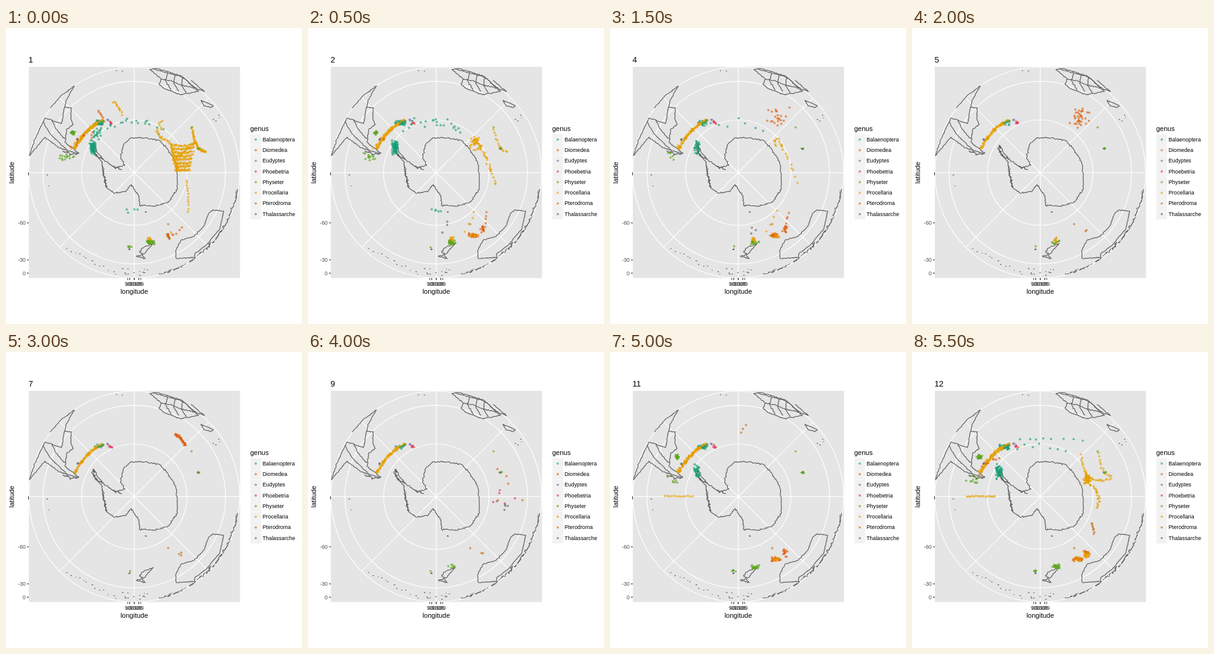
Animation of 480 by 480 pixels, one loop 6 s. Source, as an HTML page with a canvas:

```html
<!DOCTYPE html>
<html lang="en">
<head>
<meta charset="utf-8">
<title>Sightings by month</title>
<style>
html, body { margin: 0; width: 100%; height: 100%; overflow: hidden; background: #fff; }
canvas { display: block; width: 480px; height: 480px; }
</style>
</head>
<body>
<canvas id="map" width="480" height="480"></canvas>
<script>
const ctx = document.getElementById('map').getContext('2d');
const CX = 208, CY = 234.5, R = 171, STEP = 500, MONTHS = 12;
const INK = '#595959', RAD = Math.PI / 180;
const [BAL, DIO, EUD, PHO, PHY, PRO, PTE, THA] = [0, 1, 2, 3, 4, 5, 6, 7];
const genera = [
  ['Balaenoptera', '#1b9e77'], ['Diomedea', '#e0600f'], ['Eudyptes', '#7570b3'], ['Phoebetria', '#e7298a'],
  ['Physeter', '#5ca61e'], ['Procellaria', '#e69f00'], ['Pterodroma', '#c56a15'], ['Thalassarche', '#666666']
];

let seed = 1;
function rnd() {
  seed = (seed * 16807) % 2147483647;
  return seed / 2147483647;
}
const spread = s => (rnd() + rnd() - 1) * s;

function label(str, x, y, size, color = '#000', align = 'left') {
  ctx.font = size + 'px "Liberation Sans", Arial, sans-serif';
  ctx.fillStyle = color;
  ctx.textAlign = align;
  ctx.fillText(str, x, y);
}

function segment(x1, y1, x2, y2) {
  ctx.beginPath();
  ctx.moveTo(x1, y1);
  ctx.lineTo(x2, y2);
  ctx.stroke();
}

// Line through a few corners, roughened by seeded noise
function coast(rough, ...p) {
  ctx.lineWidth = 1.15;
  ctx.beginPath();
  ctx.moveTo(p[0], p[1]);
  for (let i = 2; i < p.length; i += 2) {
    const dx = p[i] - p[i - 2], dy = p[i + 1] - p[i - 1];
    const n = Math.ceil(Math.hypot(dx, dy) / 1.8);
    for (let k = 1; k <= n; k++) {
      const w = k < n ? rough : 0;
      ctx.lineTo(p[i - 2] + dx * k / n + spread(w), p[i - 1] + dy * k / n + spread(w));
    }
  }
  ctx.stroke();
}

function islets(n, x, y, sx, sy) {
  ctx.fillStyle = INK;
  while (n--) ctx.fillRect(x + spread(sx), y + spread(sy), 1 + rnd() * 1.6, 1.2);
}

function dot(g, x, y) {
  ctx.globalAlpha = 0.64;
  ctx.fillStyle = genera[g][1];
  ctx.beginPath();
  ctx.arc(x, y, 1.85, 0, 7);
  ctx.fill();
  ctx.globalAlpha = 1;
}

function blob(g, n, x, y, sx = 0, sy = sx) {
  for (let i = 0; i < Math.round(n); i++) dot(g, x + spread(sx), y + spread(sy));
}

// Points along a quadratic curve; clumps > 0 gathers them into groups
function trail(g, n, wobble, x0, y0, cx, cy, x1, y1, clumps = 0) {
  n = Math.round(n);
  for (let i = 0; i < n; i++) {
    let t = (i + 0.5) / n;
    if (clumps) t -= Math.sin(t * clumps * 2 * Math.PI) / (clumps * 2 * Math.PI) * 0.9;
    const a = (1 - t) * (1 - t), b = 2 * t * (1 - t), c = t * t;
    dot(g, a * x0 + b * cx + c * x1 + spread(wobble), a * y0 + b * cy + c * y1 + spread(wobble));
  }
}

function drawGrid() {
  ctx.fillStyle = '#e5e5e5';
  ctx.fillRect(37, 63, 342.5, 342.5);
  ctx.strokeStyle = '#fff';
  ctx.lineWidth = 1.2;
  for (const lat of [60, 30, 0]) {
    ctx.beginPath();
    ctx.arc(CX, CY, R * Math.cos(lat * RAD), 0, 7);
    ctx.stroke();
  }
  for (let a = 0; a < 360; a += 45) segment(CX, CY, CX + R * Math.cos(a * RAD), CY + R * Math.sin(a * RAD));
}

function drawLimb() {
  for (let a = 9; a < 76; a += 0.9) {
    if (a > 50 && rnd() < 0.3) continue;
    ctx.lineWidth = 0.7 + rnd();
    ctx.beginPath();
    ctx.arc(CX, CY, R - rnd() * rnd() * 5, a * RAD, (a + 0.6 + rnd() * 1.8) * RAD);
    ctx.stroke();
  }
}

function drawLand() {
  seed = 77;
  ctx.strokeStyle = INK;
  ctx.lineJoin = 'round';
  // Antarctica, with a ragged peninsula
  coast(1.5, 143, 190, 148, 202, 160, 215, 178, 227, 193, 222, 186, 212, 188, 199, 190, 190, 202, 178, 226, 178, 250, 183,
    263, 198, 275, 217, 278, 240, 278, 260, 265, 281, 243, 289, 217, 288, 216, 273, 203, 254, 195, 265, 176, 268,
    163, 259, 159, 240, 155, 217, 139, 196, 143, 190);
  coast(4, 141, 190, 144, 205, 156, 213);
  coast(3.5, 157, 223, 159, 240, 163, 258);
  coast(3, 174, 223, 188, 230);
  // South America
  coast(1, 72, 130, 90, 109, 111, 94, 97, 118, 95, 129, 106, 129, 105, 146, 109, 156, 98, 165, 96, 186, 118, 203);
  coast(1, 95, 129, 90, 155, 63, 146, 47, 180, 38, 207, 63, 177, 85, 194, 118, 204);
  coast(1, 60, 152, 72, 172, 100, 199);
  coast(1, 74, 149, 80, 162, 95, 180);
  coast(4, 92, 199, 104, 204, 118, 203);
  // Southern Africa and Madagascar
  coast(1, 233, 67, 252, 83, 248, 91, 256, 98, 282, 108, 312, 103, 285, 78, 246, 66, 233, 67);
  coast(1, 239, 66, 286, 80, 310, 99, 322, 103, 300, 85);
  coast(1, 252, 83, 266, 85, 280, 91, 306, 98);
  for (let i = 0; i < 3; i++) coast(1, 262 + 12 * i, 73 + 4 * i, 259 + 13 * i, 86 + 4 * i, 268 + 12 * i, 101 + 2 * i);
  coast(0.8, 316, 117, 336, 126, 333, 129, 321, 126, 316, 117);
  // Australia
  coast(0.9, 276, 374, 275, 361, 284, 344, 305, 338, 320, 322, 329, 300, 335, 295, 353, 297, 347, 325, 325, 352,
    306, 366, 305, 372, 276, 374);
  // New Zealand
  coast(1.4, 239, 349, 220, 357, 217, 364, 224, 366, 239, 349);
  coast(1.4, 211, 370, 220, 367, 226, 374, 211, 370);
  drawLimb();
  islets(14, 205, 396, 32, 8);
  for (let i = 0; i < 12; i++) islets(1, 96 + i * 7, 357 + i * 3.4, 4, 3);
  islets(8, 311, 195, 2, 1.5);
  islets(3, 226, 298, 2, 1);
  islets(3, 200, 358, 1.5, 2);
  islets(4, 343, 143, 9, 9);
  islets(2, 180, 69, 25, 1);
  islets(2, 75, 266, 20, 38);
}

function drawFrame(month) {
  ctx.fillStyle = '#fff';
  ctx.fillRect(0, 0, 480, 480);
  drawGrid();
  drawLand();
  label(month, 36.5, 56, 13.2);

  ctx.strokeStyle = '#333';
  ctx.lineWidth = 1.1;
  [['-60', 316], ['-30', 376], ['0', 397.5]].forEach(([s, y]) => {
    segment(34, y, 37, y);
    label(s, 32, y + 3.2, 8.8, '#4d4d4d', 'right');
  });
  segment(36.5, 234, 36.5, 239);
  for (let lon = -135; lon <= 180; lon += 45) {
    const x = CX + 10.5 * Math.sin(lon * RAD);
    segment(x, 405.5, x, 408.5);
    label(Math.abs(lon), x, 417.5, 8.8, '#4d4d4d', 'center');
  }
  label('longitude', CX, 431, 11, '#000', 'center');
  ctx.save();
  ctx.translate(13, CY);
  ctx.rotate(-Math.PI / 2);
  label('latitude', 0, 0, 11, '#000', 'center');
  ctx.restore();

  label('genus', 396, 167, 11);
  genera.forEach(([name], i) => {
    const y = 180.8 + i * 17.28;
    ctx.fillStyle = '#f2f2f2';
    ctx.fillRect(396.4, y - 8.64, 17.28, 17.28);
    dot(i, 405, y);
    label(name, 416, y + 2.95, 8.8);
  });
}

function drawSightings(month) {
  seed = 4100 + month * 37;
  // 1 at the peak month, falling to 0 after the given number of months
  const near = (peak, width) => {
    const d = Math.abs(month - peak), gap = Math.min(d, MONTHS - d);
    return gap < width ? Math.cos(gap / width * Math.PI / 2) : 0;
  };
  const summer = near(1, 4);

  // Scotia arc, present all year
  trail(PRO, 45 * summer, 3, 108, 195, 133, 158, 158, 150);
  blob(BAL, 6 + 42 * summer, 150, 154, 9, 5);
  trail(PRO, 100, 2, 112, 195, 133, 158, 157, 150, 4);
  trail(BAL, 5, 1, 149, 155, 154, 153, 159, 150);
  trail(DIO, 3, 1, 168, 150, 169, 153, 173, 156);
  blob(PHO, 3, 170, 154, 3, 2);
  blob(EUD, 2, 165, 149, 1);
  blob(THA, 2, 116, 181, 1);

  // Peninsula and southern feeding grounds
  blob(BAL, 80 * near(1.5, 3.4), 141, 194, 6, 13);
  trail(BAL, 22 * near(2, 2.5), 9, 160, 161, 205, 140, 255, 170);
  blob(BAL, 20 * near(1, 1), 148, 172, 8, 14);
  trail(DIO, 12 * near(12.7, 1.4), 7, 108, 195, 125, 175, 143, 170);

  // South American shelf
  blob(PHY, 28 * near(12.4, 2.7), 109, 170, 5, 4);
  blob(PHY, 14 * near(1.5, 3.4), 99, 208, 13, 8);
  trail(PRO, 18 * near(11.6, 1.2), 1, 87, 234, 112, 234, 136, 234);

  // South Atlantic
  trail(PRO, 12 * near(1, 1), 2, 172, 119, 184, 124, 188, 141);
  trail(DIO, 6 * near(1, 1), 1, 149, 134, 153, 139, 158, 146);
  trail(PTE, 3 * near(11, 1), 1, 222, 116, 216, 124, 211, 133);
  trail(BAL, 8 * near(12, 1), 4, 172, 146, 215, 133, 284, 146);

  // Southern Indian Ocean survey lines
  if (month === 1) {
    for (let i = 0; i < 8; i++) trail(PRO, 22, 2, 268 + i, 189 + i * 6, 285, 189 + i * 6 + spread(8), 306 - i, 188 + i * 6);
    trail(PRO, 40, 2, 268, 188, 270, 212, 280, 232);
    trail(PRO, 30, 2, 275, 213, 292, 197, 309, 184);
  }
  trail(PRO, 50 * near(1, 1.2), 2, 301, 160, 307, 201, 324, 200);
  trail(PRO, 22 * near(1, 1), 5, 253, 151, 237, 176, 268, 186);
  trail(PRO, 12 * near(1, 1), 2, 292, 245, 297, 270, 296, 300);
  blob(PRO, 40 * near(2.6, 1.6), 271, 187, 10, 12);
  trail(PRO, 44 * near(2.7, 1.6), 2.5, 272, 180, 287, 200, 304, 252, 4);
  blob(PRO, 55 * near(12, 1), 284, 206, 7, 11);
  trail(PRO, 30 * near(12, 1), 2, 275, 166, 278, 222, 324, 204);
  trail(PRO, 20 * near(12, 1), 3, 290, 217, 310, 230, 299, 254);
  trail(PTE, 8 * near(12, 1), 2, 291, 277, 294, 285, 295, 296);

  // Winter birds off southern Africa
  blob(DIO, 36 * near(5, 1.7), 273, 146, 19, 19);
  trail(DIO, 40 * near(7, 1.3), 2, 274, 133, 284, 138, 291, 152);
  if (month === 9) for (let i = 0; i < 5; i++) for (const g of [DIO, PHO, THA]) trail(g, 1, 40 - g * 4, 265, 130, 358, 205 + g * 9, 280, 332);
  blob(PHY, 1, 301, 161);
  blob(PHY, 2 + 5 * near(11, 1), 313, 195, 2);

  // Tasman Sea and New Zealand
  const tasman = Math.max(near(3, 1.9), near(11.7, 1.4));
  blob(DIO, 36 * tasman, 269, 336, 10, 4);
  blob(PRO, 12 * tasman, 269, 336, 9, 5);
  blob(DIO, 20 * tasman, 283, 326, 5, 7);
  blob(PRO, 20 * near(12, 1), 281, 328, 8, 7);
  trail(DIO, 11 * near(3, 1.4), 2, 291, 298, 288, 309, 284, 325);
  trail(PTE, 12 * near(1, 1), 1.5, 261, 334, 263, 338, 265, 342);
  blob(PTE, 1, 263, 318);
  blob(PTE, 3 * near(7, 3), 283, 328, 4);
  trail(PRO, 6 * near(3, 2), 2, 271, 293, 265, 310, 249, 337);
  blob(PRO, 30 * near(3, 2.7), 233, 344, 4, 6);
  blob(PHY, 24 * near(1, 5), 234, 348, 9, 4);
  blob(PHY, 1 + 5 * near(12, 2), 200, 355, 4, 2);
  blob(THA, 4 * near(3, 2), 228, 322, 20, 15);
  blob(BAL, 5 * near(2, 2), 207, 294, 14, 6);
}

let shown = -1;
const start = performance.now();

function tick() {
  const i = Math.floor((performance.now() - start) / STEP) % MONTHS;
  if (i !== shown) {
    shown = i;
    drawFrame(i + 1);
    drawSightings(i + 1);
  }
  requestAnimationFrame(tick);
}
tick();
</script>
</body>
</html>
```
